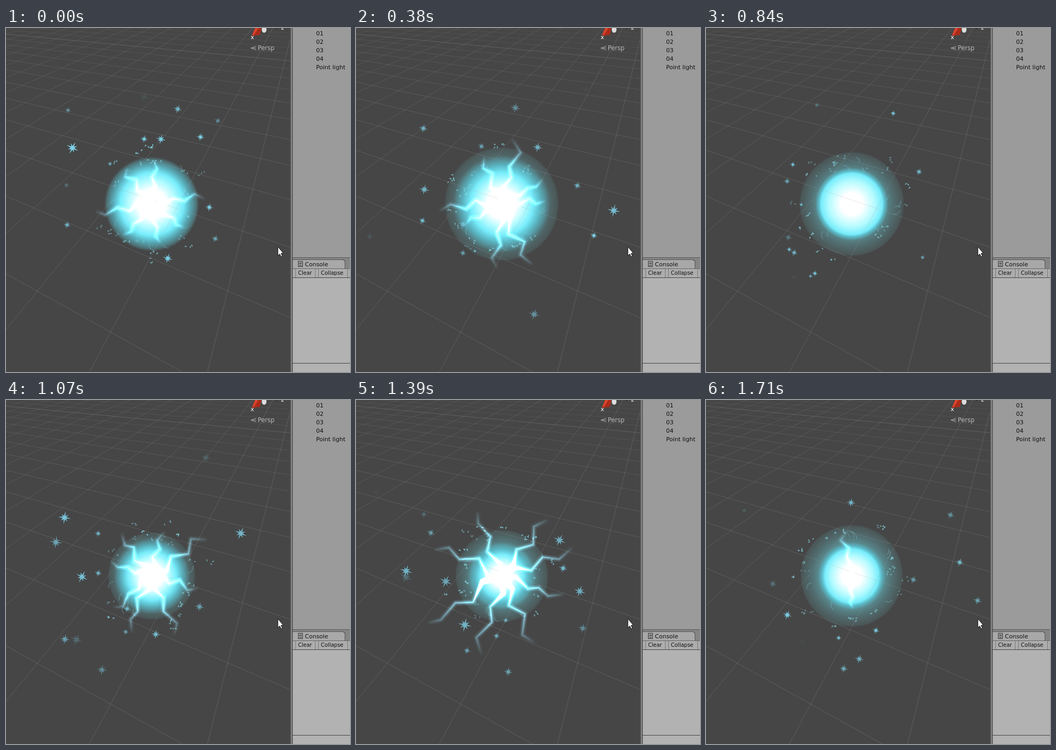
An HTML page with a canvas that plays this animation: 649x651 px, repeating every 1790 ms.

```html
<!DOCTYPE html>
<html>
<head>
<meta charset="utf-8">
<style>
html, body { margin: 0; width: 100%; height: 100%; overflow: hidden; background: #464646; }
canvas { display: block; }
</style>
</head>
<body>
<canvas id="stage" width="649" height="651"></canvas>
<script>
const ctx = document.getElementById('stage').getContext('2d');
const CX = 275, CY = 333, LOOP = 1790, TURN = Math.PI * 2;
const STAR_COUNT = 52, STAR_LIFE = 9;

// The ball pulses between these: step, core radius, halo radius, storm strength.
const pulses = [
  [0, 90, 88, .4], [5, 92, 108, .45], [8, 65, 91, 1], [11, 69, 99, 0],
  [16, 74, 72, .9], [18, 64, 88, .85], [22, 64, 97, .1],
];

const mix = (a, b, u) => a + (b - a) * u;

// The picture holds for about 77 ms, later 80 ms.
const stepAt = time => time < 1150
  ? Math.min(14, Math.floor((time + 8) / 76.67))
  : 15 + Math.floor((time - 1150) / 80);

function randomFrom(seed) {
  let count = 0;
  return (low = 0, high = 1) => {
    const wave = Math.sin(seed * 127.1 + ++count * 311.7) * 43758.5453;
    return mix(low, high, wave - Math.floor(wave));
  };
}

function ballAt(step) {
  const i = Math.min(pulses.length - 2, pulses.filter(p => p[0] <= step).length - 1);
  const from = pulses[i], to = pulses[i + 1];
  const u = (step - from[0]) / (to[0] - from[0]);
  const [, core, halo, storm] = from.map((value, j) => mix(value, to[j], u));
  return { core, halo, storm, fury: Math.min(1, storm * 2.2) };
}

function rect(color, x, y, w, h) {
  ctx.fillStyle = color;
  ctx.fillRect(x, y, w, h);
}

function path(points, close) {
  ctx.beginPath();
  for (let i = 0; i < points.length; i += 2) ctx.lineTo(points[i], points[i + 1]);
  if (close) ctx.closePath();
}

function shape(color, points) {
  path(points, true);
  ctx.fillStyle = color;
  ctx.fill();
}

function text(label, x, y, size = 11, color = '#111') {
  ctx.font = size + 'px "DejaVu Sans", sans-serif';
  ctx.fillStyle = color;
  ctx.fillText(label, x, y);
}

function radial(radius, stops) {
  const fill = ctx.createRadialGradient(CX, CY, 0, CX, CY, radius);
  for (const [at, color] of stops) fill.addColorStop(at, color);
  return fill;
}

function disc(radius, stops) {
  ctx.fillStyle = radial(radius, stops);
  ctx.beginPath();
  ctx.arc(CX, CY, radius, 0, TURN);
  ctx.fill();
}

function drawGrid() {
  ctx.lineWidth = 1;
  for (let i = 0; i < 24; i++) {
    const fade = Math.max(.05, .27 - i * .012);
    ctx.strokeStyle = `rgba(160,160,160,${i === 11 ? .3 : fade})`;
    path([0, -108 + 1662 / (i + 2.9), 536, -141 + 2880 / (i + 3.18)]);
    ctx.stroke();
    const slope = .248 + .2835 * i;
    ctx.strokeStyle = `rgba(160,160,160,${fade})`;
    path([575 - slope * 135, 0, 575 - slope * 786, 651]);
    ctx.stroke();
  }
}

function drawBall({ core, halo, fury }) {
  const solid = mix(.84, .64, fury);
  disc(halo, [[0, 'rgba(115,230,242,.45)'], [.65, 'rgba(115,230,242,.42)'],
    [.8, 'rgba(115,220,230,.26)'], [.97, 'rgba(115,210,215,.12)'], [1, 'rgba(115,210,215,0)']]);
  disc(core, [[0, '#fff'], [.3, '#fff'], [solid * .75, 'rgb(180,251,255)'],
    [solid, 'rgba(120,240,255,.97)'], [mix(solid, 1, .5), 'rgba(90,215,235,.5)'],
    [1, 'rgba(90,215,235,0)']]);
}

// Small debris circling the ball: specks in clusters and faint curls.
function drawDebris(step) {
  const random = randomFrom(step + 40);
  const onRing = (near, far) => {
    const angle = random(0, TURN), radius = random(near, far);
    return [CX + Math.cos(angle) * radius, CY + Math.sin(angle) * radius, angle];
  };
  for (let i = 0; i < 20; i++) {
    const [x, y] = onRing(70, 112);
    ctx.fillStyle = `rgba(140,225,240,${random(.3, .75)})`;
    for (let j = 0; j < 3; j++) {
      ctx.beginPath();
      ctx.ellipse(x + random(-8, 8), y + random(-5, 5), 2.2, 1.1, random(0, 3), 0, TURN);
      ctx.fill();
    }
  }
  ctx.lineWidth = 1.5;
  ctx.strokeStyle = 'rgba(130,220,235,.28)';
  for (let i = 0; i < 8; i++) {
    const [x, y, angle] = onRing(62, 82);
    ctx.beginPath();
    ctx.arc(x, y, random(7, 12), angle, angle + 1.8);
    ctx.stroke();
  }
}

function drawBolt(angle, reach, random) {
  const cos = Math.cos(angle), sin = Math.sin(angle);
  const points = [CX, CY];
  let side = random() < .5 ? -1 : 1;
  for (let i = 1; i <= 5; i++) {
    const along = reach * (i + random(-.2, .2)) / 5;
    const across = side * reach * random(.02, .09);
    points.push(CX + cos * along - sin * across, CY + sin * along + cos * across);
    side = -side;
  }
  for (const [width, alpha] of [[11, .12], [7, .22], [3, .5]]) {
    const color = a => `rgba(90,170,195,${a})`;
    ctx.strokeStyle = radial(reach,
      [[0, color(alpha)], [.5, color(alpha)], [.8, color(alpha * .5)], [1, color(0)]]);
    ctx.lineWidth = width;
    path(points);
    ctx.stroke();
  }
  const root = reach / 17;
  shape('rgba(150,235,250,.75)', [CX - sin * root, CY + cos * root, points[2] - sin * root * .6,
    points[3] + cos * root * .6, points[4], points[5], points[2] + sin * root * .6,
    points[3] - cos * root * .6, CX + sin * root, CY - cos * root]);
}

// A new set of bolts strikes every second step and stretches while it lasts.
function drawStorm(step, { storm, fury }) {
  const random = randomFrom(Math.floor(step / 2) + 9);
  const count = Math.round(8 * fury);
  const longest = (75 + 115 * storm) * (step % 2 ? 1.06 : 1);
  const turn = random(0, TURN);
  ctx.globalCompositeOperation = 'lighter';
  for (let i = 0; i < count; i++) {
    const angle = turn + (i + random(-.35, .35)) * TURN / count;
    drawBolt(angle, longest * random(.6, 1), random);
  }
  ctx.globalCompositeOperation = 'source-over';
}

function drawStar(x, y, radius, alpha, tilt) {
  const points = [];
  for (let i = 0; i < 16; i++) {
    const angle = i * Math.PI / 8 + tilt;
    const r = radius * (i % 2 ? .33 : i % 4 ? .85 : 1.15);
    points.push(x + Math.cos(angle) * r, y + Math.sin(angle) * r);
  }
  shape(`rgba(130,220,246,${alpha})`, points);
}

// Stars leave the ball at random times, swell, drift outwards and fade.
function drawStars(step, { fury }) {
  for (let i = 0; i < STAR_COUNT; i++) {
    const random = randomFrom(i + 3);
    const age = step - mix(-STAR_LIFE, 22, (i + random()) / STAR_COUNT);
    const angle = random(0, TURN);
    const distance = random(55, 100) + age * random(8, 24);
    const size = random(6, 12), light = random(.55, .95), tilt = random(.1, .5);
    if (age < 0 || age > STAR_LIFE) continue;
    const swell = Math.min(1, .35 + age / 4) * mix(.6, 1, fury);
    const fade = Math.min(1, (STAR_LIFE - age) / 3);
    drawStar(CX + Math.cos(angle) * distance, CY + Math.sin(angle) * distance,
      size * swell, light * fade, tilt);
  }
}

function drawGizmo() {
  shape('#a92b19', [470, 0, 482, 0, 479, 13, 464, 15]);
  shape('#d8452d', [470, 0, 476, 0, 468, 13, 464, 14]);
  ctx.fillStyle = '#dcdcdc';
  ctx.beginPath();
  ctx.ellipse(487, 3, 4.5, 6, 0, 0, TURN);
  ctx.fill();
  rect('#333', 509, 0, 3, 2);
  text('x', 461.5, 21, 11, '#fff');
  text('z', 519, 3, 11, '#fff');
  ctx.lineWidth = 1;
  ctx.strokeStyle = '#aaa';
  for (const y of [34.5, 38, 41.5]) {
    path([462, 38, 472, y]);
    ctx.stroke();
  }
  text('Persp', 475, 42, 11.5, '#bbb');
}

function drawPanels() {
  rect('#707070', 536, 0, 113, 651);
  rect('#505050', 536, 0, 1, 651);
  rect('#858585', 538, 0, 2, 651);
  rect('#3c3c3c', 540, 0, 1, 651);
  rect('#9b9b9b', 541, 0, 108, 434);
  ['01', '02', '03', '04', 'Point light'].forEach((label, i) => text(label, 585, 14 + i * 16));
  rect('#555', 541, 434, 108, 1);
  rect('#858585', 541, 435, 108, 20);
  shape('#555', [541, 438, 637, 438, 640, 441, 640, 455, 541, 455]);
  shape('#a8a8a8', [541, 439, 636, 439, 639, 442, 639, 455, 541, 455]);
  ctx.strokeStyle = '#333';
  ctx.lineWidth = 1;
  ctx.strokeRect(551.5, 441.5, 8, 10);
  for (const y of [444, 446, 449]) rect('#333', 553, y, 5, 1);
  text('Console', 564, 451);
  rect('#666', 541, 455, 108, 1);
  rect('#adadad', 541, 456, 108, 16);
  for (const x of [546, 583, 589, 644]) rect('#777', x, 456, 1, 16);
  text('Clear', 551, 467, 10);
  text('Collapse', 594, 467, 10);
  rect('#444', 541, 472, 108, 1);
  rect('#b2b2b2', 541, 473, 108, 178);
  rect('#444', 541, 634, 108, 1);
}

function drawCursor() {
  shape('#fff', [513, 414, 513, 431, 516.5, 427.5, 519, 433, 521.5, 432, 519, 426.5, 523, 426]);
  ctx.strokeStyle = '#111';
  ctx.lineWidth = 1;
  ctx.stroke();
}

function draw(time) {
  const step = stepAt(time);
  const ball = ballAt(step);
  rect('#464646', 0, 0, 649, 651);
  drawBall(ball);
  drawGrid();
  ctx.lineJoin = 'round';
  drawDebris(step);
  drawStorm(step, ball);
  drawStars(step, ball);
  ctx.lineJoin = 'miter';
  drawGizmo();
  drawPanels();
  drawCursor();
}

const origin = performance.now();
function tick() {
  draw((performance.now() - origin) % LOOP);
  requestAnimationFrame(tick);
}
tick();
</script>
</body>
</html>
```
